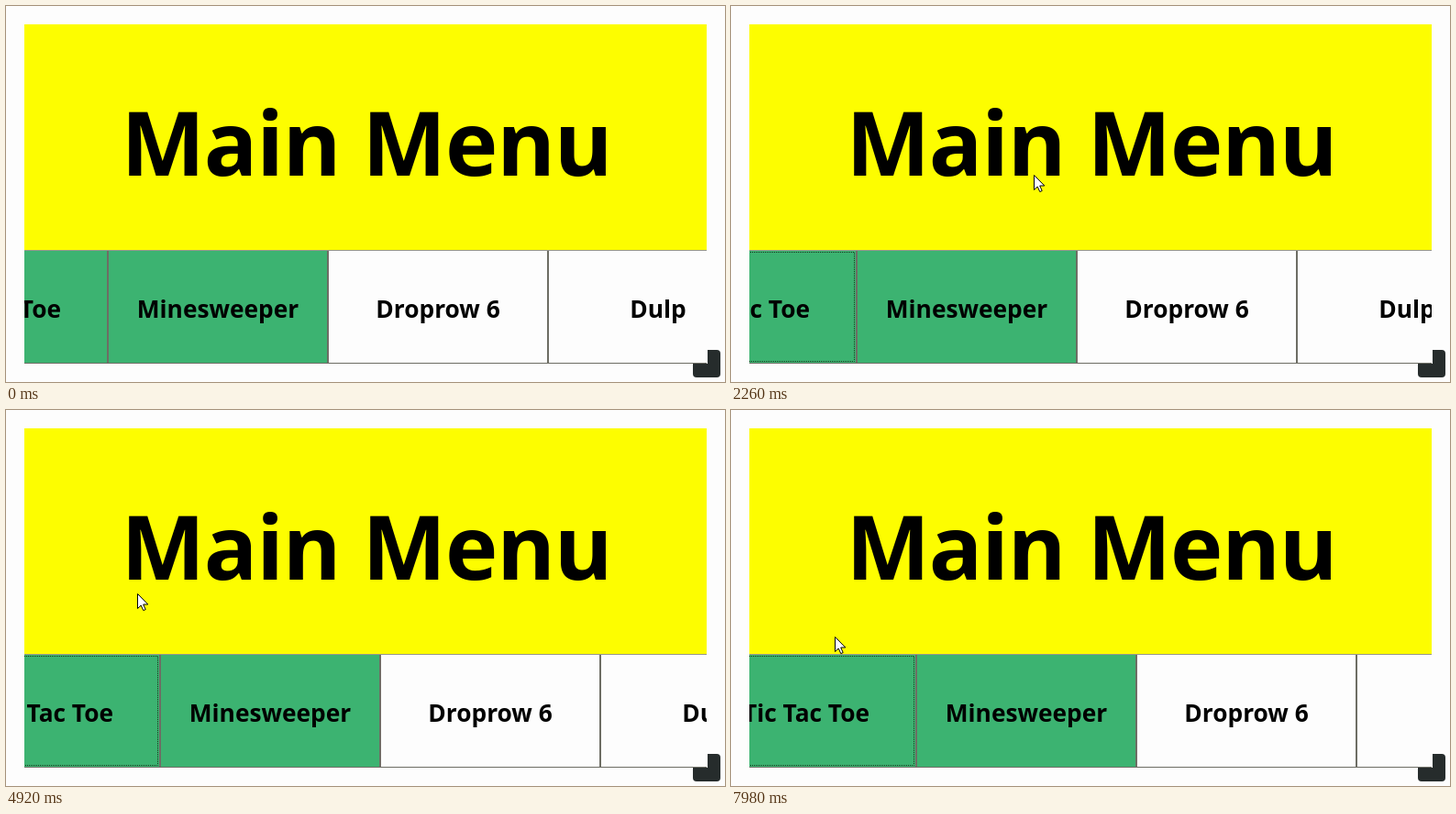
An HTML page for the animation above (8000 ms loop, 784 by 410 pixels).

```html
<!DOCTYPE html>
<html lang="en">
<head>
<meta charset="utf-8">
<title>Main Menu</title>
<style>
  html, body { margin: 0; width: 100%; height: 100%; overflow: hidden; background: #fdfdfd; }
  svg { display: block; width: 100%; height: 100%; }
  text { font-family: "Open Sans", "Noto Sans", sans-serif; font-weight: 700; text-anchor: middle; }
</style>
</head>
<body>
<svg viewBox="0 0 784 410">
  <defs>
    <clipPath id="panel"><rect x="20" y="20" width="744" height="370"/></clipPath>
  </defs>
  <rect width="784" height="410" fill="#fdfdfd"/>
  <rect x="749" y="375" width="30" height="30" rx="4" fill="#262c2c"/>
  <rect x="20" y="266" width="745" height="124" fill="#fdfdfd"/>
  <rect x="20" y="20" width="744" height="246" fill="#fdfd00"/>
  <text x="393" y="185" font-size="97" letter-spacing="-1.1">Main Menu</text>
  <g clip-path="url(#panel)">
    <g id="strip">
      <path id="focus" d="M2.5 2.5H237.5V121.5H2.5Z" fill="none" stroke="#16361b" stroke-dasharray="1" stroke-dashoffset=".5"/>
    </g>
    <path d="M20 266.5H764" stroke="#96968c"/>
  </g>
  <path id="cursor" d="M.5 .5V16.5L4.2 13L6.8 18.6L9.2 17.5L6.7 12H11.8Z" fill="#fff" stroke="#000"/>
</svg>
<script>
const LOOP = 8000, BEAT = 140, BUTTON_W = 240;
const GREEN = "#3cb371", WHITE = "#fdfdfd";
const $ = id => document.getElementById(id);
const strip = $("strip"), focusRing = $("focus"), cursor = $("cursor");

const labels = ["Tic Tac Toe", "Minesweeper", "Droprow 6", "Dulp"];

// Places where the pointer slows down
const stops = [
  { t: 860, x: 763, y: 388 },
  { t: 1520, x: 423, y: 192 },
  { t: 3100, x: 218, y: 174 },
  { t: 4180, x: 208, y: 175 },
  { t: 4920, x: 143, y: 200 },
  { t: 6320, x: 124, y: 216 },
  { t: 7980, x: 113, y: 247 }
];

const ease = k => k * k * (3 - 2 * k);

function add(tag, attrs, text = "") {
  const el = document.createElementNS("http://www.w3.org/2000/svg", tag);
  for (const key in attrs) el.setAttribute(key, attrs[key]);
  el.textContent = text;
  strip.insertBefore(el, focusRing);
}

labels.forEach((label, i) => {
  const x = i * BUTTON_W, fill = i < 2 ? GREEN : WHITE;
  add("rect", { x: x + 0.5, y: 0.5, width: BUTTON_W - 1, height: 123, fill, stroke: "#6d6d64" });
  add("text", { x: x + BUTTON_W / 2, y: 74, "font-size": 26.3 }, label);
});

function pointerAt(t) {
  const next = Math.max(1, stops.findIndex(s => s.t >= t));
  const a = stops[next - 1], b = stops[next];
  const k = ease((t - a.t) / (b.t - a.t));
  return [a.x + (b.x - a.x) * k, a.y + (b.y - a.y) * k].map(Math.round);
}

function render(t) {
  // Each beat holds three poses, lasting 20, 100 and 20 ms
  const beat = Math.floor(t / BEAT), rest = t - beat * BEAT;
  const pose = rest < 20 ? 0 : rest < 120 ? 1 : 2;
  const now = beat * BEAT + [0, 20, 120][pose];
  const shift = Math.floor((beat * 3 + pose) * 0.533 + 0.6);
  strip.setAttribute("transform", `translate(${shift - 129} 266)`);

  const active = now >= stops[0].t;
  focusRing.style.display = cursor.style.display = active ? "" : "none";
  if (active) cursor.setAttribute("transform", `translate(${pointerAt(now)})`);
}

const start = performance.now();
function tick() {
  render((performance.now() - start) % LOOP);
  requestAnimationFrame(tick);
}
tick();
</script>
</body>
</html>
```
